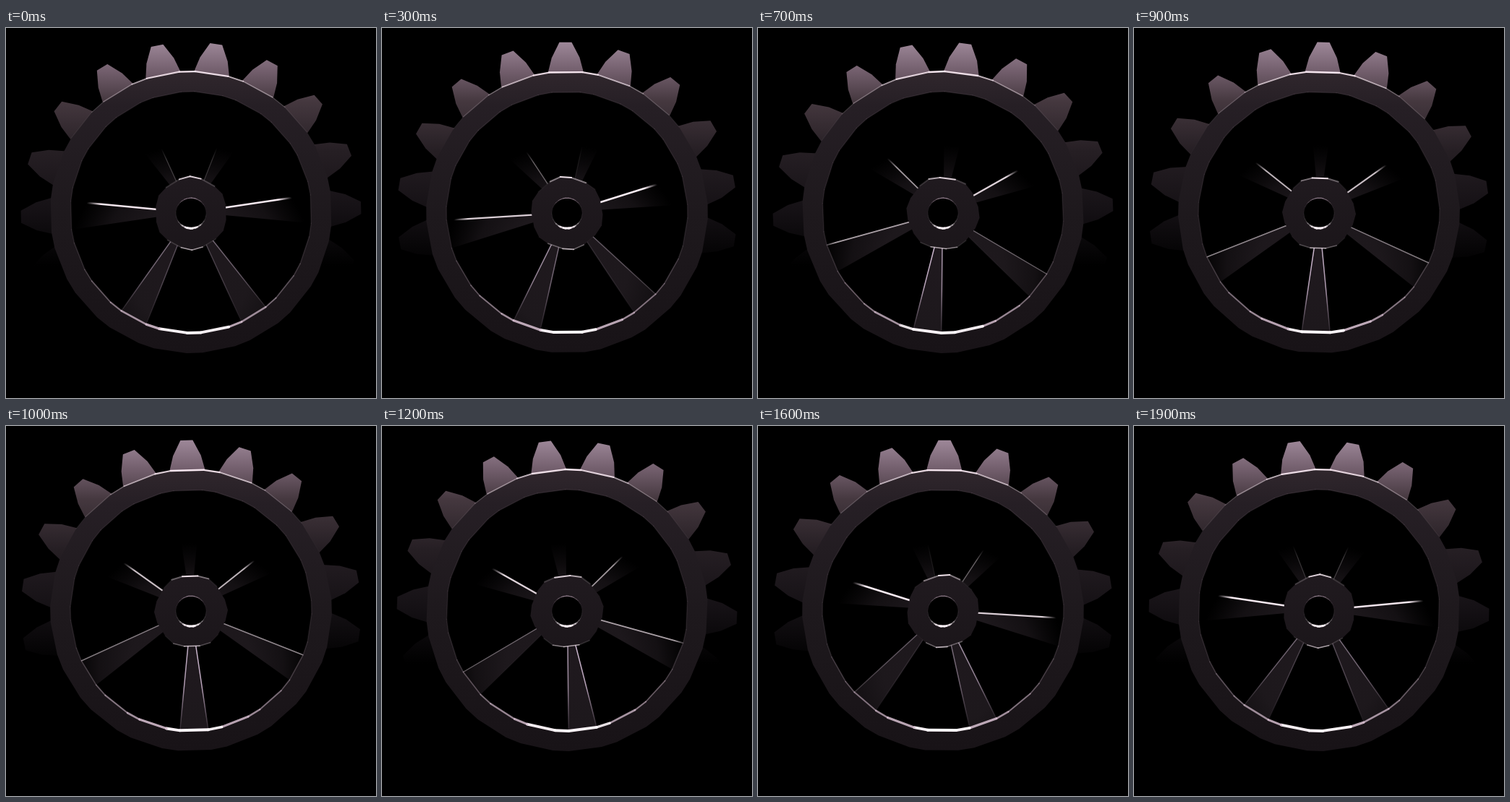
Write an HTML page with a canvas that moves like this. It is 512 px wide and 512 px high and loops after 2 s.

```html
<!DOCTYPE html>
<html lang="en">
<head>
<meta charset="utf-8">
<title>Turning gear</title>
<style>
  html, body { margin: 0; width: 100%; height: 100%; overflow: hidden; background: #000; }
  canvas { display: block; width: 100vw; height: 100vh; }
</style>
</head>
<body>
<canvas id="stage" width="512" height="512"></canvas>
<script>
const ctx = document.getElementById('stage').getContext('2d');
const CX = 256, CY = 255;
const LOOP = 2000, STEP = 100, DEGREES_PER_STEP = -3, START = -1.5;
const RIM_OUTER = 195, RIM_INNER = 167, HOLE = 21;
const TEETH = 18, SPOKES = 6, GAP = 3.25;

const range = n => Array.from({ length: n }, (_, i) => i);
const rad = degrees => degrees * Math.PI / 180;

// Angles run clockwise from straight up.
const polar = (degrees, r) =>
  [CX + r * Math.sin(rad(degrees)), CY - r * Math.cos(rad(degrees))];

// A point `out` along the direction and `side` to its right.
function along(degrees, out, side) {
  const s = Math.sin(rad(degrees)), c = Math.cos(rad(degrees));
  return [CX + out * s + side * c, CY - out * c + side * s];
}

function withStops(gradient, stops) {
  stops.forEach(([at, color]) => gradient.addColorStop(at, color));
  return gradient;
}
const linear = (a, b, stops) => withStops(ctx.createLinearGradient(...a, ...b), stops);
const vertical = (y0, y1, stops) => linear([0, y0], [0, y1], stops);

// Light falls through the rim, so the lit zone is its opening moved down.
const litZone = stops => withStops(ctx.createRadialGradient(256, 332, 0, 256, 332, 170), stops);

const toothFill = vertical(20, 345, [
  [0, '#9d8798'], [0.12, '#735f6d'], [0.25, '#45383f'],
  [0.46, '#261f24'], [0.71, '#151115'], [0.84, '#0a080a'], [0.95, '#000']
]);
const rimFill = vertical(60, 450, [
  [0, '#30272d'], [0.12, '#261f25'], [0.5, '#1e191d'], [1, '#181317']
]);
const hubFill = vertical(204, 308, [[0, '#201a1f'], [1, '#1b161a']]);
const spokeFill = litZone([
  [0, '#1f191e'], [0.5, '#1d181c'], [0.75, 'rgba(28,23,27,.7)'], [1, 'rgba(22,18,21,0)']
]);
const spokeEdge = litZone([
  [0, '#eedfe9'], [0.9, '#fbeef5'], [1, 'rgba(245,230,240,0)']
]);

function trace(points) {
  points.forEach(([x, y], i) => i ? ctx.lineTo(x, y) : ctx.moveTo(x, y));
  ctx.closePath();
}

function fill(color, ...outlines) {
  ctx.beginPath();
  outlines.forEach(trace);
  ctx.fillStyle = color;
  ctx.fill('evenodd');
}

function line(a, b, color, width, alpha) {
  if (alpha < 0.02) return;
  ctx.globalAlpha = Math.min(1, alpha);
  ctx.strokeStyle = color;
  ctx.lineWidth = width;
  ctx.beginPath();
  ctx.moveTo(...a);
  ctx.lineTo(...b);
  ctx.stroke();
  ctx.globalAlpha = 1;
}

// Calls draw(a, b, up) per side; up is 1 at the top and -1 at the bottom.
function eachSide(points, draw) {
  points.forEach((a, i) => {
    const b = points[(i + 1) % points.length];
    const mx = (a[0] + b[0]) / 2 - CX, my = (a[1] + b[1]) / 2 - CY;
    draw(a, b, -my / Math.hypot(mx, my));
  });
}

// Corners sit at both ends of every gap between teeth.
const ring = (turn, r) => range(TEETH).flatMap(i =>
  [-GAP, GAP].map(offset => polar(turn + i * 360 / TEETH + offset, r)));

function drawTooth(angle) {
  const profile = [[186, 26.5], [194, 24.5], [214, 19.3], [235.3, 8.5]];
  const right = profile.map(([out, side]) => along(angle, out, side));
  const left = profile.map(([out, side]) => along(angle, out, -side)).reverse();
  fill(toothFill, [...right, ...left]);
}

function drawSpoke(angle) {
  const inner = 44, outer = 169, narrow = 4.8, wide = 20;
  const corner = (out, side) => along(angle, out, side);
  fill(spokeFill, [corner(inner, -narrow), corner(outer, -wide),
                   corner(outer, wide), corner(inner, narrow)]);
  const down = Math.max(0, -Math.cos(rad(angle)));
  for (const side of [-1, 1]) {
    const a = corner(inner, side * narrow), b = corner(outer, side * wide);
    const up = -side * Math.sin(rad(angle - side * 6.6));
    const facing = Math.max(0, up) ** 3;
    line(a, b, spokeEdge, 1.2 + 1.4 * facing ** 2, facing);
    const glint = linear(a, b, [[0, '#cdb9d0'], [0.5, '#b5a0b6'], [1, 'rgba(150,130,150,.15)']]);
    line(a, b, glint, 1.5, 1.1 * down ** 2 * (1 - Math.abs(up)));
  }
}

function drawRim(turn) {
  const outer = ring(turn, RIM_OUTER), inner = ring(turn, RIM_INNER);
  fill(rimFill, outer, inner);
  eachSide(outer, (a, b, up) => {
    const lit = Math.max(0, up);
    line(a, b, '#f6e6ef', 1.3 + 1.1 * lit ** 12, lit ** 6);
  });
  eachSide(inner, (a, b, up) => {
    const lit = Math.max(0, -up);
    line(a, b, lit > 0.95 ? '#fff8fc' : '#d5bdce', 1.5 + 2.5 * lit ** 6, 0.1 + 0.9 * lit ** 2.5);
  });
}

function drawHub(turn) {
  const outline = range(SPOKES).flatMap(i => {
    const middle = turn + i * 60;
    return [polar(middle, 51), polar(middle + 17.5, 49.5), polar(middle + 42.5, 49.5)];
  });
  const hole = ring(turn, HOLE);
  ctx.save();
  ctx.translate(0, 1.2);
  fill(hubFill, outline);
  fill('#000', hole);
  eachSide(outline, (a, b, up) =>
    line(a, b, '#f2e4ec', up > 0 ? 2 : 1.6, up ** 12 * (up > 0 ? 1 : 0.75)));
  eachSide(hole, (a, b, up) =>
    line(a, b, up > 0 ? '#8f7c8a' : '#fff4fa', up > 0 ? 1.2 : 1 + 2 * up ** 4,
         0.08 + 0.92 * up ** 4));
  ctx.restore();
}

function draw(time) {
  const turn = START + DEGREES_PER_STEP * Math.floor(time % LOOP / STEP);
  ctx.fillStyle = '#000';
  ctx.fillRect(0, 0, 512, 512);
  range(TEETH).forEach(i => drawTooth(turn + (i + 0.5) * 360 / TEETH));
  range(SPOKES).forEach(i => drawSpoke(turn + (i + 0.5) * 360 / SPOKES));
  drawRim(turn);
  drawHub(turn);
}

let start;
function tick(now) {
  start ??= now;
  draw(now - start);
  requestAnimationFrame(tick);
}
ctx.lineCap = 'round';
requestAnimationFrame(tick);
</script>
</body>
</html>
```
